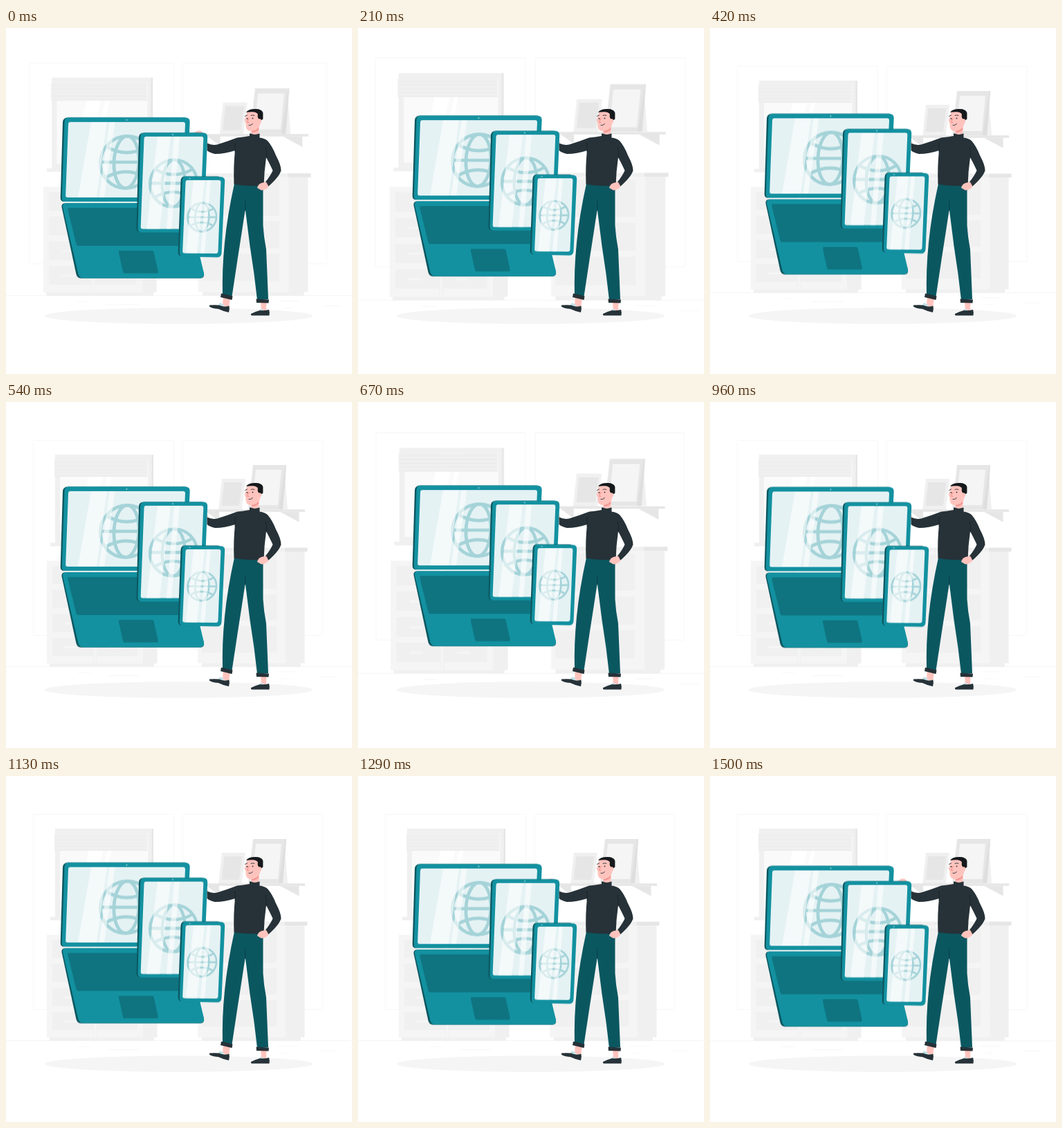
An HTML page for the animation above (1.54 s loop, 500 by 500 pixels).

```html
<!DOCTYPE html>
<html lang="en">
<head>
<meta charset="utf-8">
<title>Responsive devices</title>
<style>
  html, body { margin: 0; width: 100%; height: 100%; overflow: hidden; background: #fff; }
  svg { display: block; width: 100%; height: 100%; }

  .room, .devices { animation: 1540ms linear -40ms infinite; }
  .room { animation-name: heartbeat; transform-origin: 248.7px 230px; }
  .devices { animation-name: float; }

  @keyframes heartbeat {
    0%, 30%, 40%, 60%, 100% { transform: scale(1); }
    10%, 50% { transform: scale(1.102); }
  }
  @keyframes float {
    0%, 100% { transform: translateY(.4px); }
    50% { transform: translateY(-9.6px); }
  }

  .g1 { fill: #fafafa; }
  .g2 { fill: #f5f5f5; }
  .g3 { fill: #f0f0f0; }
  .g4 { fill: #e6e6e6; }
  .line { fill: none; stroke: #f0f0f0; }
  .faint { fill: none; stroke: #f7f7f7; }
  .teal { fill: #1391a0; }
  .edge { fill: #0b5760; }
  .deep { fill: #0f7480; }
  .glass { fill: #e5f2f4; }
  .shine { fill: #fff; opacity: .58; }
  .globe { fill: none; stroke: #a4d3d8; }
  .dot { fill: #8fcdd4; }
  .ink { fill: #263238; }
  .hair { fill: #15191c; }
  .skin { fill: #ffc3bd; }
  .blush { fill: #f59a96; }
  .pants { fill: #0b5760; }
  .detail { fill: none; stroke: #263238; stroke-linecap: round; }
</style>
</head>
<body>
<svg viewBox="0 0 500 500">
  <defs>
    <g id="globe">
      <circle r="36.5"/>
      <ellipse rx="17.5" ry="36.5"/>
      <path d="M-36 0H36M-29-22Q0-5 29-22M-29 22Q0 5 29 22"/>
    </g>
    <g id="drawer">
      <path class="g3" d="M0 0H59V26H0Z"/>
      <path class="g2" d="M18 12H36V15H18Z"/>
    </g>
    <clipPath id="laptopScreen"><path d="M93 136H256Q259 136 259 139L254 245H89Q86 245 86.2 242L90 139Q90.2 136 93 136Z"/></clipPath>
    <clipPath id="tabletScreen"><path d="M202.5 157H282.5Q285.5 157 285.3 160L280 290.5H197.5Q194.5 290.5 194.7 287.5L199.5 160Q199.7 157 202.5 157Z"/></clipPath>
    <clipPath id="phoneScreen"><path d="M262.5 220H307.5Q310.5 220 310.4 223L306.5 323Q306.3 326 303.3 326L258 325.5Q255 325.5 255.2 322.5L259.5 223Q259.7 220 262.5 220Z"/></clipPath>
  </defs>

  <g class="room">
    <g class="faint">
      <rect x="39.5" y="55.3" width="203" height="282.2" rx="2"/>
      <rect x="255.5" y="55.3" width="202.5" height="282.2" rx="2"/>
      <path d="M104 391H122M147 395.3H193M392 390H418M398 400H409M452 397H478"/>
    </g>
    <path class="line" style="stroke:#f4f4f4" d="M0 382.5H498"/>

    <!-- window -->
    <path class="g3" d="M71 76H213V204H71Z"/>
    <path class="g4" d="M210.5 76H213V204H210.5Z"/>
    <path class="g1" d="M78 83H205.5V197H78Z"/>
    <path fill="#fff" d="M126 83H146L120 197H98ZM152 83H158L132 197H126Z"/>
    <path class="g3" d="M64 203.5H219V208.5H64ZM70 83H204.5V108H70Z"/>
    <path class="line" style="stroke:#e9e9e9;stroke-width:.7" d="M70 87H204.5M70 92H204.5M70 97H204.5M70 102H204.5M70 107.5H204.5"/>

    <!-- left cabinet -->
    <path class="g2" d="M59 229.5H198V378H59Z"/>
    <path class="g3" d="M198 229.5H218.5V378H198ZM63 378H214V382.5H63Z"/>
    <path class="line" d="M126.5 237V378M131 237V378"/>
    <g id="drawers"></g>

    <!-- right cabinet -->
    <path class="g2" d="M277 216H404V377.5H277Z"/>
    <path class="g3" d="M404 216H431.5V377.5H404ZM283 377.5H426V382.5H283ZM283 220H391V270H283ZM283 278H391V316H283ZM283 324H391V362H283Z"/>
    <path class="g3" d="M274 210.5H403V216H274Z"/>
    <path class="g4" d="M403 210.5H435.5V216H403Z"/>

    <!-- shelf and pictures -->
    <path class="g3" d="M403 105L407 155H396Z"/>
    <path class="g4" d="M357 91H405L400 155H350Z"/>
    <path fill="#dedede" d="M404 91H405L400 155H394Z"/>
    <path class="g2" d="M361 98H398L393 149H356Z"/>
    <path class="g3" d="M312 111H346L340.5 157H307Z"/>
    <path class="g4" d="M315.5 116H341.5L337 150H311.5Z"/>
    <path class="g4" d="M288 155.3H432V158.7H288ZM290 158.7H308V172Z"/>
    <path class="g4" d="M396 158.7H423.5V173.5Z"/>
  </g>

  <ellipse class="g2" cx="249.5" cy="416" rx="194" ry="11.7"/>

  <!-- man -->
  <g>
    <path class="skin" d="M272 151Q276 147.5 281 148.5Q284 150 290 160L294 172L284 170Q274 160 272 151Z"/>
    <path class="skin" d="M314 388L324 391L322 403L313 401ZM368 395H376.5L376 409H369Z"/>
    <path fill="#bfe0e6" d="M309 397L315 400L313 403L307 401ZM367 406L373 407L371 410L366 410Z"/>
    <path class="ink" d="M294 400.5Q301 400 308 400.5Q315 404 322.5 401.5Q323.5 406 322 411Q313 409 307 406Q297 405 294 402.5ZM354 413Q361 409.5 367 408Q373 409 380 407Q381.5 411 380.5 415.5H355Q353.5 414.5 354 413Z"/>
    <path class="pants" d="M330 225L371.5 228Q371.5 250 371.5 285Q372.5 302 376 320L379 392L363 393Q359 355 352.5 315L345.8 262Q340 300 334.5 335L326.5 388L313 386Q312 350 316 310Q320 270 330 225Z"/>
    <path d="M346 250L345.6 264" stroke="#073f46" fill="none"/>
    <path class="ink" d="M311 383.5L327.5 387.5L326.5 393L310 389ZM361.5 391.5L380 392.5L379.5 397.5L362 397Z"/>
    <path class="ink" d="M334 158.5Q343 157.5 352 156V152.5H366.5V158.5Q373.5 159 378 163Q385 171 390 184Q397.5 198 397.5 206Q395 215 378 230L374.5 223Q382 214 385.5 206Q382 198 376 187Q373 208 372.5 228Q350 229 329.5 226Q328.5 200 331 177Q316 182 302 182Q294 180 290.5 177V166.5Q298 170 305 168.5Q321 163.5 334 158.5Z"/>
    <path d="M375 172Q377 180 376 188M331 166V180" fill="none" stroke="#151e23" stroke-width=".7"/>
    <path class="skin" d="M376 222.5L379.5 229Q376 234 369 234.5L363 231Q364 226 369 224Z"/>
    <path class="skin" d="M354 142H365.5V152.8Q359 155 354.5 152.8Z"/>
    <path class="skin" d="M348 122Q358 118 368 125Q369 137 365.5 144Q359 150.5 350.5 148.5Q346 146 346.5 138.5L344.5 133Q347 129 348 122Z"/>
    <path class="blush" d="M355 149Q361 148 365.3 143.5L365.3 147Q360 151.5 355 151Z"/>
    <path class="hair" d="M347 122Q350 117 360 117Q369.5 116.7 371.4 122.5V131.5L368.5 133.7Q365 132.5 363.8 129V124Q361 121 357 121.2Q351 121 347 122Z"/>
    <ellipse class="skin" cx="366.5" cy="134.5" rx="2.6" ry="3.2"/>
    <circle class="ink" cx="348.5" cy="131" r=".9"/>
    <circle class="ink" cx="356.5" cy="130.5" r=".9"/>
    <path class="detail" stroke-width=".9" d="M345.5 127.5L348.5 126M354 126.5Q356.5 125 359 126.5M351 140.5Q354 141.5 356.5 138.5"/>
    <path d="M351.5 130Q349 134 348.5 136.2L351 136.5" fill="none" stroke="#ef7f7f" stroke-width=".9"/>
  </g>

  <g class="devices">
    <!-- laptop -->
    <path class="edge" d="M84 253.5H255L286 355Q287 361.5 281 361.8H108Q103 361.5 101.5 356L80.5 259Q80 254 84 253.5Z"/>
    <path class="teal" d="M86 253H262L286 354.5Q287 361 281 361.4H111Q106 361 104.5 356L82 259Q81.5 254 86 253Z"/>
    <path class="deep" d="M91 260H250L262 315H105Q102 315 101.3 312L89.3 262.5Q89 260 91 260ZM164.5 322H211Q213 322 213.6 324L219.8 352Q220 354.5 218 354.5H171.5Q169.5 354.5 169 352.5L162.8 324Q162.5 322 164.5 322Z"/>
    <path class="edge" d="M89 129.5H258Q264 129.5 264 136L258 251H84Q78.5 251 78.7 245L82 136Q82.5 130 89 129.5Z"/>
    <path class="teal" d="M90 129.5H259Q266 129.5 265.7 136L260 251H86Q80.5 251 80.8 245L84.5 136Q84.8 129.5 90 129.5Z"/>
    <circle class="dot" cx="174.5" cy="133" r="1.1"/>
    <g clip-path="url(#laptopScreen)">
      <path class="glass" d="M80 130H270V250H80Z"/>
      <use href="#globe" class="globe" stroke-width="4.6" transform="translate(174 194) skewX(-2) scale(1.03)"/>
      <path class="shine" d="M123 136H146L131 245H104ZM149.5 136H157.5L142 245H134.5Z"/>
    </g>

    <!-- tablet -->
    <path class="edge" d="M199 151.5H283Q289 152 289 157L282 295H194Q188.3 295 188.5 289L192 157.5Q192.5 152 199 151.5Z"/>
    <path class="teal" d="M200 151.5H285Q291.5 151.5 291.2 158L285.5 289Q285 295.5 279 295.5H196Q190.2 295.5 190.5 289L194.2 157.5Q194.6 151.5 200 151.5Z"/>
    <circle class="dot" cx="241" cy="154.3" r="1"/>
    <g clip-path="url(#tabletScreen)">
      <path class="glass" d="M190 150H295V300H190Z"/>
      <use href="#globe" class="globe" stroke-width="4.6" transform="translate(242 224.5) skewX(-2) scale(.93)"/>
      <path class="shine" d="M219 157H238L222 291H203ZM243 157H251L239 291H232Z"/>
    </g>

    <!-- phone -->
    <path class="edge" d="M258 214.5H306Q311 215 311 220L305 331L254 330Q248.5 329.5 248.7 324L252.5 220.5Q253 215 258 214.5Z"/>
    <path class="teal" d="M260 214.7L310.5 215.3Q316.5 215.5 316.2 221.5L311.5 325.5Q311 331.5 305 331.5L256 330.5Q250.5 330 250.8 324.5L254.7 220Q255 214.7 260 214.7Z"/>
    <path d="M264.5 217.5H267" stroke="#8fcdd4" fill="none"/>
    <g clip-path="url(#phoneScreen)">
      <path class="glass" d="M250 215H320V330H250Z"/>
      <use href="#globe" class="globe" stroke-width="4.6" transform="translate(283.3 273.5) skewX(-2) scale(.57)"/>
      <path class="shine" d="M271 220H287L276 326H260ZM290.5 220H296L287 326H281Z"/>
    </g>
  </g>
</svg>
<script>
  const drawers = document.getElementById('drawers');
  for (const x of [67, 131])
    for (const y of [237, 271.5, 306.5, 341])
      drawers.innerHTML += `<use href="#drawer" x="${x}" y="${y}"/>`;
</script>
</body>
</html>
```
